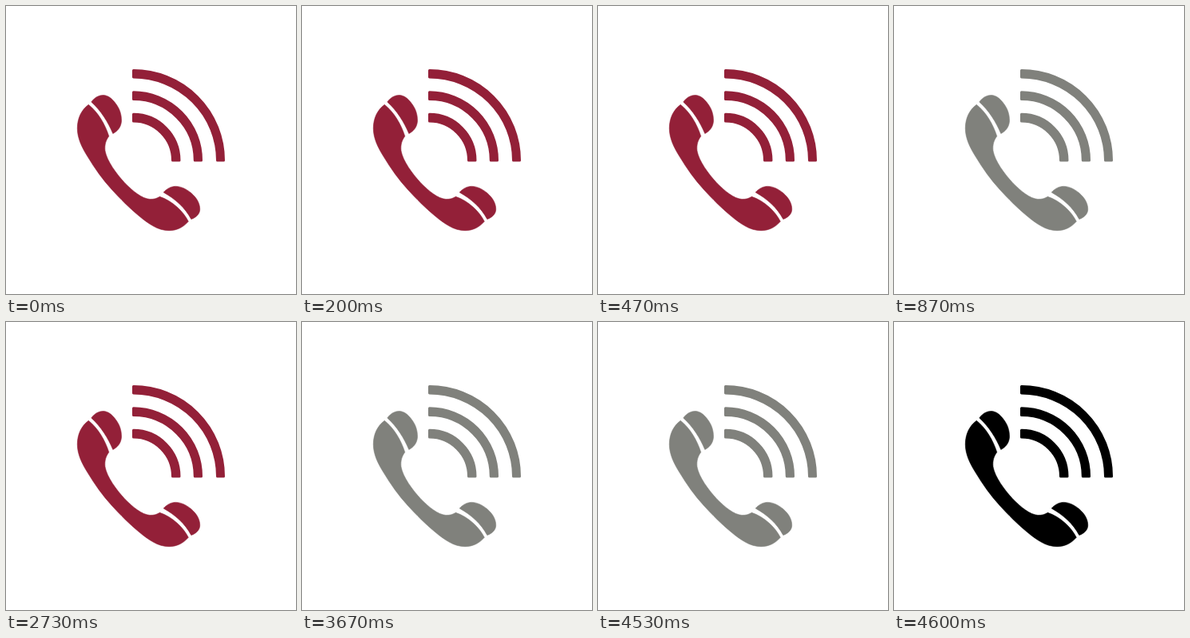
Recreate the animation shown at these times as an HTML page without scripts. Size 363 by 360 pixels, loop 5.2 s.

```html
<!DOCTYPE html>
<html lang="en">
<head>
<meta charset="utf-8">
<title>Ringing phone</title>
<style>
  html, body { margin: 0; width: 100%; height: 100%; overflow: hidden; background: #fff; }
  svg { display: block; width: 100%; height: 100%; }
  .phone {
    --red: #932038;
    --grey: #80817c;
    --black: #000;
    stroke-linejoin: round;
    animation: tint 5.2s step-end infinite;
  }
  .waves { stroke-width: 3; }
  /* colour holds at 0, 870, 1800, 2730, 3670 and 4600 ms */
  @keyframes tint {
    0%       { fill: var(--red);   stroke: var(--red); }
    16.7308% { fill: var(--grey);  stroke: var(--grey); }
    34.6154% { fill: var(--black); stroke: var(--black); }
    52.5%    { fill: var(--red);   stroke: var(--red); }
    70.5769% { fill: var(--grey);  stroke: var(--grey); }
    88.4615%, 100% { fill: var(--black); stroke: var(--black); }
  }
</style>
</head>
<body>
<svg viewBox="0 0 363 360">
  <g class="phone" stroke-width=".6">
    <!-- handset -->
    <path d="M103.300 123.300C94 130 89.300 141 89.300 153C89.300 165 95 177 102 188C111 203 121 217 132 229C143 241 155 253 166 262C178 272 190 280.700 204 280.700C214 280.700 222 276.500 228.300 269.300C222 256.500 208 243.500 192.500 238.300C189 240.500 185 241.700 180 241.500C170 240.500 159.500 232 149 221.500C138 209.500 126.500 194 124 181C123.300 173 125 168 128.800 162.800C124 147.500 115 132.500 103.300 123.300Z"/>
    <!-- ear and mouth caps -->
    <path d="M106.800 120C111 114 117 111.300 122 111.500C128 111.800 133 116 137 121.500C142 128 144.700 135 144.500 144C144 151 140 156.500 133.800 159.500C127.700 145 119 131 106.800 120Z"/>
    <path d="M197.200 233C201.500 228 207 225.400 212.500 225.400C219 225.400 226 229 231.500 233.500C238 239 242.700 246 242.700 254C242.700 260 238 264.500 231.800 266.500C224 251.800 211.500 241 197.200 233Z"/>
    <g class="waves">
      <path d="M159.500 80.500A113 112.500 0 0 1 272.500 193H264.500A105 104 0 0 0 159.500 89Z"/>
      <path d="M159.500 107.800A85 85.200 0 0 1 244.500 193H236.300A76.800 76.500 0 0 0 159.500 116.500Z"/>
      <path d="M159.500 135.300A57.500 57.700 0 0 1 217 193H208.500A49 49 0 0 0 159.500 144Z"/>
    </g>
  </g>
</svg>
</body>
</html>
```
